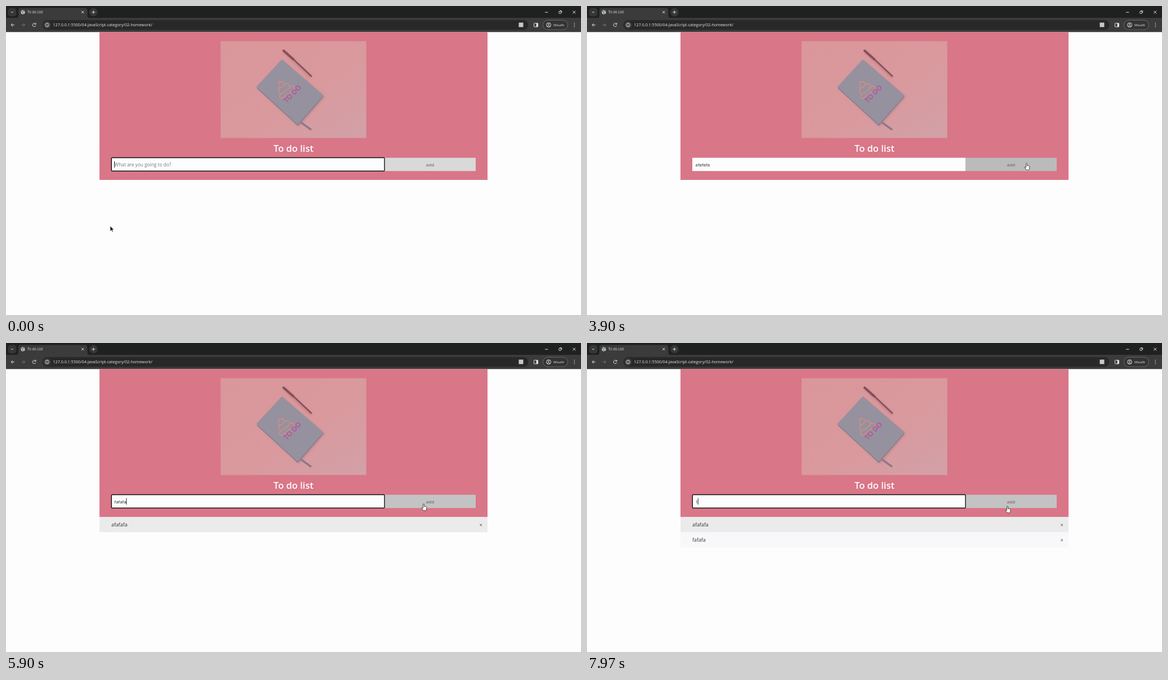
Write an HTML page that moves like this. It is 1021x549 px and loops after 8 s.

```html
<!DOCTYPE html>
<html lang="en">
<head>
<meta charset="utf-8">
<title>To do List</title>
<style>
  html, body { margin: 0; width: 100%; height: 100%; overflow: hidden; background: #fdfdfd; }
  svg { display: block; width: 100vw; height: 100vh; }
  text { font-family: "Open Sans", "Noto Sans", sans-serif; white-space: pre; }
  .icon { fill: none; stroke: #dedede; stroke-width: 1; }
</style>
</head>
<body>
<svg viewBox="0 0 1021 549">
  <defs>
    <linearGradient id="photo" x1="0" y1="0" x2="1" y2="1">
      <stop offset="0" stop-color="#da969b"/>
      <stop offset=".55" stop-color="#d9999d"/>
      <stop offset="1" stop-color="#d2a1a8"/>
    </linearGradient>
    <filter id="soft" x="-20%" y="-20%" width="140%" height="140%"><feGaussianBlur stdDeviation="2"/></filter>
  </defs>
  <rect width="1021" height="549" fill="#fdfdfd"/>

  <g id="browser">
    <rect width="1021" height="22" fill="#1f2020"/>
    <rect y="21" width="1021" height="25.3" fill="#3b3b3b"/>
    <path d="M17 21.5q5 0 5-5V8q0-4.500 4.500-4.500h113.500q4.500 0 4.500 4.500v8.500q0 5 5 5z" fill="#3b3b3b"/>
    <rect x="3.500" y="3.500" width="15" height="15" rx="5" fill="#353636"/>
    <path class="icon" d="M9 10l2 2 2-2"/>
    <circle cx="30" cy="11" r="3.700" fill="#c4c7c9"/>
    <path d="M27 9.500q3 0 2.500 2t2 2.500M30 7.500q0 2.500 3 2" fill="none" stroke="#4a4c4e"/>
    <text x="38" y="13.300" font-size="6.200" fill="#e3e3e3">To do List</text>
    <path class="icon" d="M134 8.700l4.400 4.400m0-4.400l-4.400 4.400"/>
    <circle cx="155.300" cy="11" r="7.500" fill="#353636"/>
    <path class="icon" d="M152.300 11h6m-3-3v6"/>
    <path class="icon" d="M957 11.200h5.500M1006.300 8.500l5 5m0-5l-5 5"/>
    <rect class="icon" x="981.800" y="9.500" width="3.800" height="3.800" rx=".8"/>
    <path class="icon" d="M983.300 8.300h2.500q1 0 1 1v2.500"/>
    <path class="icon" d="M15 33.700H9.200m2.800-2.900l-2.900 2.900 2.900 2.900"/>
    <path class="icon" d="M27.500 33.700h5.800m-2.800-2.900l2.900 2.900-2.900 2.900" style="stroke:#777"/>
    <path class="icon" d="M52.600 32a3 3 0 1 0 .3 2.800M53 30v2.500h-2.500"/>
    <rect x="64.500" y="25" width="863" height="17.200" rx="8.600" fill="#282828"/>
    <circle cx="73" cy="33.700" r="6.600" fill="#3b3b3b"/>
    <circle class="icon" cx="73" cy="33.700" r="3.300"/>
    <path class="icon" d="M73 33.300v2.200m0-4v1"/>
    <text x="83.500" y="36.300" font-size="7.150" fill="#e6e6e6">127.0.0.1:5500/04-JavaScript-category/02-homework/</text>
    <rect x="910.500" y="29.500" width="8" height="8" fill="#c8c8c8"/>
    <rect class="icon" x="937.500" y="30.500" width="7" height="6.500" rx=".8"/>
    <path d="M941.500 30.500h3v6.500h-3z" fill="#dedede"/>
    <rect x="953.500" y="25.200" width="44" height="17" rx="8.500" fill="#333" stroke="#707070" stroke-width=".9"/>
    <circle class="icon" cx="963.500" cy="33.700" r="4"/>
    <circle class="icon" cx="963.500" cy="32.500" r="1.200"/>
    <path class="icon" d="M960.800 36.200q2.700-2 5.400 0"/>
    <text x="972" y="35.900" font-size="6.150" fill="#e3e3e3">Misafir</text>
    <path d="M1008.700 30h1.300v1.300h-1.300zm0 3h1.300v1.300h-1.300zm0 3h1.300v1.300h-1.300z" fill="#dedede"/>
  </g>

  <rect x="166" y="46.300" width="689" height="262.700" fill="#d97688"/>
  <g id="picture">
    <rect x="381" y="62.500" width="258.700" height="172" fill="url(#photo)"/>
    <path d="M492 99L566 161 520 214 449 148z" fill="#a9747c" opacity=".55" filter="url(#soft)"/>
    <path d="M494 81l48 46" stroke="#b9787f" stroke-width="3" filter="url(#soft)"/>
    <path d="M524 207l18 13" stroke="#8e7989" stroke-width="3.500"/>
    <path d="M490 96L562.500 159 518 210.500 445.500 144z" fill="#96919e" stroke="#96919e" stroke-width="2" stroke-linejoin="round"/>
    <path d="M446 146l72 66 45-51" fill="none" stroke="#827b8a" stroke-width="1.300"/>
    <path d="M493 79.500l17 15" stroke="#85505a" stroke-width="4.300" stroke-linecap="round"/>
    <path d="M508 92.500l34 32" stroke="#85505a" stroke-width="2.600" stroke-linecap="round"/>
    <path d="M-13 11C-18 11-17 4-11 3-14-3-9-6-6-6-8-11-2-12 0-16 4-13 7-10 5-6 10-6 12-2 10 3 16 4 17 11 12 11zM-6-6Q0-4 5-6M-11 3Q0 6 10 3"
      transform="translate(494.500 147) rotate(-38)" fill="none" stroke="#d58d82" stroke-width="1.500"/>
    <text transform="translate(508.500 156) rotate(-46)" y="4.500" text-anchor="middle" font-size="12.300" font-weight="600" fill="#bd4b9c">TO DO</text>
  </g>
  <text x="510.500" y="259" text-anchor="middle" font-size="16.500" font-weight="600" fill="#fff">To do list</text>
  <rect x="187" y="269.700" width="485" height="23.500" fill="#fdfdfd"/>
  <rect id="add" x="672" y="269.700" width="162" height="23.500"/>
  <text x="753" y="284.700" text-anchor="middle" font-size="8" fill="#5a5a5a">add</text>
  <rect id="ring" x="187.300" y="269.500" width="484.800" height="23.800" rx="1.500" fill="none" stroke="#111" stroke-width="1.400"/>
  <text id="field" x="192.500" y="284.700"></text>
  <rect id="caret" y="275.700" width=".9" height="11.500" fill="#111"/>
  <g id="rows"></g>

  <g id="arrow">
    <path d="M0 0v9l2.200-1.900 1.500 3.200 1.500-.7-1.500-3.100h2.900z" fill="#111" stroke="#eee" stroke-width=".6"/>
  </g>
  <g id="beam">
    <path d="M-2-4h1.400l.6.500.6-.5h1.400M-2 4h1.400l.6-.5.6.5h1.400M0-3.500v7" fill="none" stroke="#222" stroke-width=".9"/>
  </g>
  <g id="hand">
    <path d="M-1 1q0-1.300 1-1.300t1 1.300v3.200q3.800 0 4.300 1.300v3q0 3-2 3.300h-2.600q-2 0-4-4.300-.3-1.300 1-.9l1.300 1z" fill="#fff" stroke="#222" stroke-width=".8" stroke-linejoin="round"/>
  </g>
</svg>
<script>
const DURATION = 8000, BLINK = 530;
const $ = id => document.getElementById(id);
const set = (id, attrs) => { for (const k in attrs) $(id).setAttribute(k, attrs[k]); };
const show = (id, on) => set(id, { visibility: on ? "visible" : "hidden" });
const ease = p => p * p * (3 - 2 * p);
const last = (list, t) => list.filter(e => e[0] <= t).pop();

// Interpolates keys of the form [time, value, value...].
function track(keys, t, curve = ease) {
  const i = keys.findIndex(k => k[0] > t);
  if (i < 0) return keys[keys.length - 1].slice(1);
  if (!i) return keys[0].slice(1);
  const a = keys[i - 1], b = keys[i];
  const p = curve((t - a[0]) / (b[0] - a[0]));
  return a.slice(1).map((v, j) => v + (b[j + 1] - v) * p);
}
const grey = v => `rgb(${v},${v},${v})`;

const pointer = [
  [0, 185, 391], [30, 185, 391], [200, 335, 285], [960, 335, 285], [1230, 351, 290],
  [3270, 351, 290], [3760, 780.5, 279.5], [4230, 780.5, 279.5], [4500, 690, 318],
  [4700, 583, 300], [4830, 505, 282], [5640, 505, 282], [5900, 741.5, 286],
  [6250, 741.5, 286], [6900, 446, 276], [7790, 446, 276], [7970, 746.5, 290]
];
const typed = [
  [0, ""], [2370, "a"], [2430, "af"], [2630, "afa"], [2760, "afaf"], [2860, "afafa"],
  [2960, "afafaf"], [3100, "afafafa"], [4230, ""], [5140, "f"], [5300, "fa"],
  [5370, "faf"], [5470, "fafa"], [5640, "fafaf"], [5700, "fafafa"], [6130, ""], [7500, "1"]
];
const focus = [[0, true], [3830, false], [5000, true], [6030, false], [7170, true]];
const caretResets = [[-430], [100], [5000], [7170], ...typed.filter(e => e[1])];
const addShade = [[3480, 217], [3780, 187], [4380, 187], [4650, 215], [5760, 215],
  [5980, 187], [6430, 187], [6700, 213], [7830, 213], [8050, 187]];
const rowShade = [[4400, 235], [4560, 221], [4640, 221], [4840, 235]];
const rows = [
  { text: "afafafa", from: 4230, shade: t => grey(track(rowShade, t)[0]) },
  { text: "fafafa", from: 6130, shade: () => "#f8f8fa" }
];

$("rows").innerHTML = rows.map((row, i) => `<g id="row${i}" transform="translate(0 ${309 + 27 * i})">
  <rect id="rowFill${i}" x="166" width="689" height="27.200"/>
  <text x="187" y="17" font-size="8.850" fill="#333">${row.text}</text>
  <path d="M841.400 12.500l3.600 3.600m0-3.600l-3.600 3.600" stroke="#444" stroke-width=".9"/></g>`).join("");

function render(t) {
  const text = last(typed, t)[1], focused = last(focus, t)[1];
  $("field").textContent = text || "What are you going to do?";
  set("field", { "font-size": text ? 7.9 : 8.3, fill: text ? "#222" : "#777" });
  show("ring", focused);
  const sinceReset = t - last(caretResets, t)[0];
  show("caret", focused && Math.floor(sinceReset / BLINK) % 2 === 0);
  set("caret", { x: 192.2 + (text ? $("field").getComputedTextLength() : 0) });
  set("add", { fill: grey(track(addShade, t)[0]) });

  rows.forEach((row, i) => {
    show("row" + i, t >= row.from);
    set("rowFill" + i, { fill: row.shade(t) });
  });

  const [x, y] = track(pointer, t);
  const inForm = y > 269 && y < 294;
  const kind = inForm && x > 187 && x < 672 ? "beam" : inForm && x >= 672 && x < 834 ? "hand" : "arrow";
  for (const id of ["arrow", "beam", "hand"]) show(id, id === kind);
  set(kind, { transform: `translate(${x} ${y})` });
}

const start = performance.now();
function tick() {
  render((performance.now() - start) % DURATION);
  requestAnimationFrame(tick);
}
tick();
</script>
</body>
</html>
```
